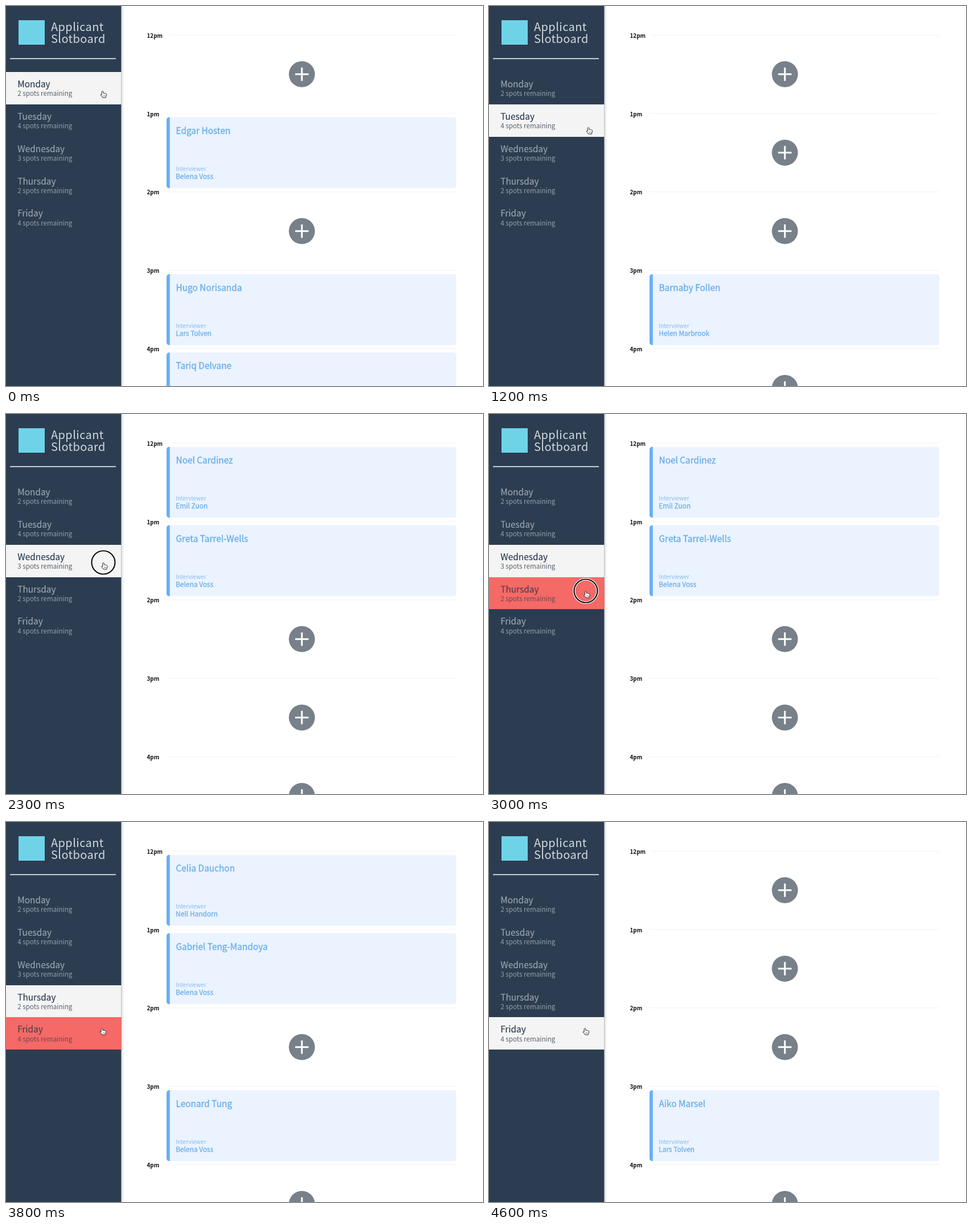
Animation, 838 px wide and 668 px high, one loop 4700 ms. Source, as an HTML page with a canvas:

```html
<!DOCTYPE html>
<html lang="en">
<head>
<meta charset="utf-8">
<title>Applicant Slotboard</title>
<style>
html, body { margin: 0; width: 100%; height: 100%; overflow: hidden; background: #fff; }
canvas { display: block; }
</style>
</head>
<body>
<canvas id="stage" width="838" height="668"></canvas>
<script>
const ctx = document.getElementById('stage').getContext('2d');
const LOOP = 4700;
const STEP = 100;
const FONT = '"Noto Sans CJK JP", "Noto Sans CJK SC", "Noto Sans CJK", "Noto Sans", sans-serif';
const NAVY = '#2c3d51';
const ROW_TOP = 115.8, ROW_HEIGHT = 56.9, SIDEBAR = 202.5;
const SLOT_TOP = 51, SLOT_HEIGHT = 137.9;

const HOURS = ['12pm', '1pm', '2pm', '3pm', '4pm'];
const DAYS = [
  { name: 'Monday', spots: 2, slots: { 1: ['Edgar Hosten', 'Belena Voss'], 3: ['Hugo Norisanda', 'Lars Tolven'], 4: ['Tariq Delvane', ''] } },
  { name: 'Tuesday', spots: 4, slots: { 3: ['Barnaby Follen', 'Helen Marbrook'] } },
  { name: 'Wednesday', spots: 3, slots: { 0: ['Noel Cardinez', 'Emil Zuon'], 1: ['Greta Tarrel-Wells', 'Belena Voss'] } },
  { name: 'Thursday', spots: 2, slots: { 0: ['Celia Dauchon', 'Nell Handorn'], 1: ['Gabriel Teng-Mandoya', 'Belena Voss'], 3: ['Leonard Tung', 'Belena Voss'] } },
  { name: 'Friday', spots: 4, slots: { 3: ['Aiko Marsel', 'Lars Tolven'] } }
];

// Each press shows a ring; the day switches one step later.
const PRESSES = [900, 2200, 3000, 4000];
const RING_TIME = 200;

// time, x, y of the pointer's fingertip
const PATH = [
  [0, 169.5, 149], [200, 169.7, 153], [500, 171.5, 179.5], [800, 174, 211],
  [900, 174.5, 213], [1500, 174.5, 213], [1800, 173.5, 226], [2100, 171.5, 255],
  [2300, 171, 261], [2500, 171, 263], [2700, 170.5, 281], [3000, 170, 311],
  [3300, 170, 312], [3500, 169.5, 332], [3800, 168.5, 362], [LOOP, 168.5, 362]
];

function pointerAt(time) {
  const i = PATH.findIndex(p => p[0] > time);
  const [t0, x0, y0] = PATH[i - 1], [t1, x1, y1] = PATH[i];
  const k = (time - t0) / (t1 - t0);
  return { x: x0 + (x1 - x0) * k, y: y0 + (y1 - y0) * k };
}

function rect(x, y, w, h, color) {
  ctx.fillStyle = color;
  ctx.fillRect(x, y, w, h);
}

function line(x1, y1, x2, y2, color, width) {
  ctx.strokeStyle = color;
  ctx.lineWidth = width;
  ctx.beginPath();
  ctx.moveTo(x1, y1);
  ctx.lineTo(x2, y2);
  ctx.stroke();
}

function circle(x, y, r) {
  ctx.beginPath();
  ctx.arc(x, y, r, 0, Math.PI * 2);
}

function text(str, x, y, size, color, { weight = 400, spacing = 0, bolder = 0 } = {}) {
  ctx.font = `${weight} ${size}px ${FONT}`;
  ctx.letterSpacing = spacing + 'px';
  ctx.fillStyle = color;
  ctx.fillText(str, x, y);
  if (bolder) {
    ctx.strokeStyle = color;
    ctx.lineWidth = bolder;
    ctx.strokeText(str, x, y);
  }
}

function drawCard(y, [student, interviewer]) {
  ctx.save();
  ctx.beginPath();
  ctx.roundRect(282, y + 6.5, 509, 125, 5);
  ctx.clip();
  rect(282, y + 6.5, 509, 125, '#ebf3ff');
  rect(282, y + 6.5, 5.8, 125, '#68aff6');
  ctx.restore();
  text(student, 298.5, y + 35.8, 15.4, '#69aee9', { bolder: 0.35 });
  text('Interviewer', 298.2, y + 101.4, 10, '#84bbee', { weight: 300 });
  text(interviewer, 298.3, y + 115.2, 11.9, '#69aee9', { bolder: 0.28 });
}

function drawAddButton(y) {
  const x = 519.8, cy = y + 68.9;
  circle(x, cy, 22.9);
  ctx.fillStyle = '#788089';
  ctx.fill();
  line(x - 11.8, cy, x + 11.8, cy, '#fff', 3);
  line(x, cy - 11.8, x, cy + 11.8, '#fff', 3);
}

function drawSchedule(day) {
  HOURS.forEach((hour, i) => {
    const y = SLOT_TOP + i * SLOT_HEIGHT;
    text(hour, 247.5, y + 4.6, 9.9, '#111', { weight: 700 });
    line(i ? 281 : 287, y, 791, y, '#f2f2f2', 1);
    if (day.slots[i]) drawCard(y, day.slots[i]);
    else drawAddButton(y);
  });
}

function drawSidebar(selected, hovered) {
  const shadow = ctx.createLinearGradient(SIDEBAR, 0, SIDEBAR + 5, 0);
  shadow.addColorStop(0, 'rgba(0,0,0,0.14)');
  shadow.addColorStop(1, 'rgba(0,0,0,0)');
  rect(SIDEBAR, 0, 5, 668, shadow);
  rect(0, 0, SIDEBAR, 668, NAVY);

  rect(22, 25, 46, 43, '#6fd3e8');
  const title = { weight: 300, spacing: 0.4 };
  text('Applicant', 79, 44.3, 20, '#d3d9de', title);
  text('Slotboard', 79, 65.3, 20, '#d3d9de', title);
  line(7, 92.4, 193, 92.4, '#fff', 1.5);

  DAYS.forEach((day, i) => {
    const y = ROW_TOP + i * ROW_HEIGHT;
    const top = Math.round(y), height = Math.round(y + ROW_HEIGHT) - top;
    let nameColor = '#9ca5ae', spotsColor = '#969fa9';
    if (i === selected) {
      rect(0, top, SIDEBAR, height, '#f4f4f4');
      nameColor = '#2a3b50';
      spotsColor = '#566271';
    } else if (i === hovered) {
      rect(0, top, SIDEBAR, height, '#f56966');
      nameColor = '#503f4f';
      spotsColor = '#6c4854';
    }
    text(day.name, 20.2, y + 27, 15.4, nameColor, { bolder: 0.15 });
    text(`${day.spots} spots remaining`, 20.2, y + 42.5, 11.65, spotsColor, { weight: 300 });
  });
}

function drawRing({ x, y }) {
  circle(x, y, 20.5);
  ctx.strokeStyle = '#fff';
  ctx.lineWidth = 4.4;
  ctx.stroke();
  ctx.strokeStyle = '#111';
  ctx.lineWidth = 2.2;
  ctx.stroke();
}

function drawHand({ x, y }) {
  ctx.save();
  ctx.translate(x, y);
  ctx.lineJoin = 'round';
  ctx.beginPath();
  ctx.moveTo(-1.3, 7.2);
  ctx.lineTo(-1.3, 1.3);
  ctx.quadraticCurveTo(0, -0.6, 1.3, 1.3);
  ctx.lineTo(1.3, 4.2);
  ctx.quadraticCurveTo(2.6, 3.4, 3.6, 4.6);
  ctx.quadraticCurveTo(4.8, 4, 5.7, 5.1);
  ctx.quadraticCurveTo(7.2, 4.9, 7.2, 6.6);
  ctx.quadraticCurveTo(7.2, 9.2, 5.9, 10.4);
  ctx.lineTo(5.9, 12);
  ctx.lineTo(0.3, 12);
  ctx.quadraticCurveTo(-0.6, 10.2, -3.4, 7.4);
  ctx.quadraticCurveTo(-3.2, 5.5, -1.3, 7.2);
  ctx.closePath();
  ctx.fillStyle = '#fff';
  ctx.fill();
  ctx.strokeStyle = '#252b33';
  ctx.lineWidth = 1;
  ctx.stroke();
  for (const gap of [1.5, 3.2, 4.9]) line(gap, 7.6, gap, 10, '#40464e', 0.6);
  ctx.restore();
}

function draw(time) {
  const pointer = pointerAt(time);
  const selected = PRESSES.filter(t => time >= t + STEP).length;
  const hovered = Math.floor((pointer.y - ROW_TOP) / ROW_HEIGHT);
  rect(0, 0, 838, 668, '#fff');
  drawSchedule(DAYS[selected]);
  drawSidebar(selected, hovered);
  if (PRESSES.some(t => time >= t && time < t + RING_TIME)) drawRing(pointer);
  drawHand(pointer);
}

const start = performance.now();
function tick() {
  const elapsed = (performance.now() - start) % LOOP;
  draw(Math.floor(elapsed / STEP) * STEP);
  requestAnimationFrame(tick);
}
tick();
</script>
</body>
</html>
```
